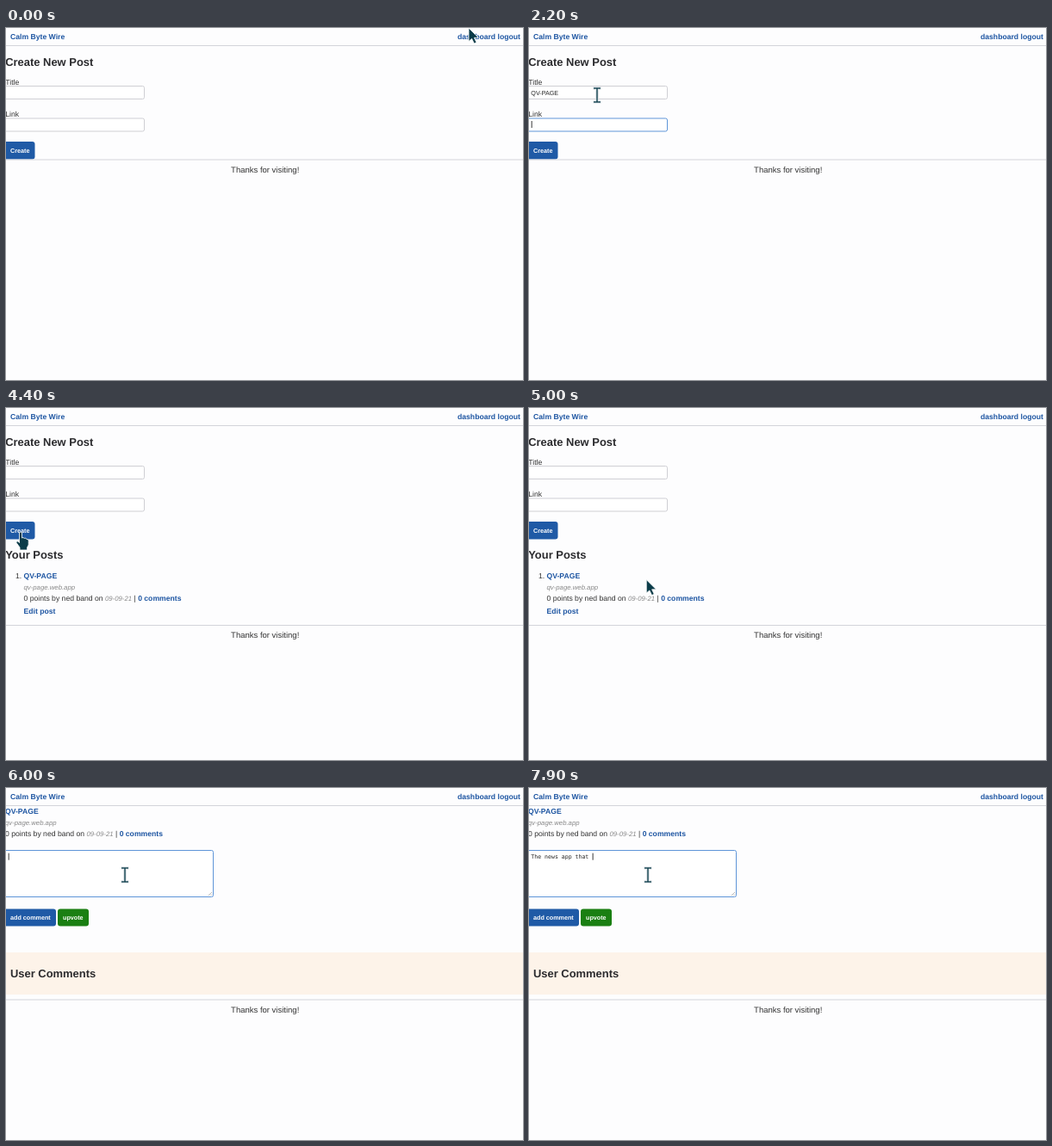
Animation, 600 px wide and 409 px high, one loop 8000 ms. Source, as an HTML page:

```html
<!DOCTYPE html>
<html lang="en">
<head>
<meta charset="utf-8">
<title>Create post demo</title>
<style>
html, body { margin: 0; width: 100%; height: 100%; overflow: hidden; background: #fdfdfe; }
svg { display: block; width: 600px; height: 409px; }
text { font: 8.63px "Liberation Sans", Arial, sans-serif; fill: #333; white-space: pre; text-rendering: geometricPrecision; }
.head { font-size: 12.95px; font-weight: bold; fill: #2b2b2e; }
.link { font-weight: bold; fill: #1d55a2; }
.note { font-size: 7.77px; font-style: italic; fill: #888; }
.typed { font-size: 7.2px; fill: #222; }
.mono { font: 6.56px "DejaVu Sans Mono", monospace; fill: #222; }
.label { font-size: 7.2px; font-weight: bold; fill: #fff; }
.thanks { font-size: 9.5px; text-anchor: middle; }
.status { font-size: 6.64px; fill: #ddd; }
.rule { stroke: #d3d4da; }
.field { fill: #fff; stroke: #cfcfd4; }
.field.focus { stroke: #5e95d8; }
.button { fill: #1f5aa6; }
.button.hot { fill: #2f7bdc; }
.link.hot { fill: #2f76d2; }
.cursor { fill: #0b3c49; stroke: #fff; stroke-width: .8; stroke-linejoin: round; }
</style>
</head>
<body>
<svg viewBox="0 0 600 409">
  <rect width="600" height="409" fill="#fdfdfe"/>
  <text class="link" x="5" y="13">Calm Byte Wire</text>
  <text class="link" x="524" y="13">dashboard logout</text>
  <path class="rule" d="M0 20.5H600"/>

  <g id="form">
    <text class="head" x="-.8" y="44">Create New Post</text>
    <text x="-.7" y="65.5">Title</text>
    <rect id="titleBox" class="field" x="-2" y="67.5" width="162.5" height="15" rx="2"/>
    <text id="titleText" class="typed" x="2.3" y="78"></text>
    <text x="-.7" y="103">Link</text>
    <rect id="linkBox" class="field" x="-2" y="105" width="162.5" height="15" rx="2"/>
    <text id="linkText" class="typed" x="2.3" y="115"></text>
    <rect id="create" class="button" x="-4" y="132" width="37.5" height="20.5" rx="3"/>
    <text class="label" x="5" y="144.8">Create</text>
  </g>

  <g id="posts">
    <text class="head" x="-.8" y="175">Your Posts</text>
    <text x="11" y="198">1.</text>
  </g>

  <g id="summary">
    <text class="link" x="20.5" y="198">QV-PAGE</text>
    <text class="note" x="20.5" y="211">qv-page.web.app</text>
    <text x="20.5" y="224">0 points by ned band on <tspan class="note">09-09-21</tspan> | <tspan id="comments" class="link">0 comments</tspan></text>
  </g>
  <text id="edit" class="link" x="20.5" y="238.7">Edit post</text>

  <g id="detail">
    <rect id="area" class="field" x="-2" y="72.5" width="242.5" height="54" rx="2"/>
    <path d="M235 125L239 121M237.5 125L239 123.5" stroke="#888" stroke-width=".6"/>
    <text id="areaText" class="mono" x="2.3" y="82"></text>
    <rect class="button" x="-4" y="140.5" width="62" height="20" rx="3"/>
    <text class="label" x="5" y="153.2">add comment</text>
    <rect x="60" y="140.5" width="36" height="20" rx="3" fill="#1a7f12"/>
    <text class="label" x="66" y="153.2">upvote</text>
    <rect y="191" width="600" height="49" fill="#fdf3e9"/>
    <text class="head" x="5" y="219.7">User Comments</text>
  </g>

  <g id="footer">
    <path class="rule" d="M0 153H600"/>
    <text class="thanks" x="300.7" y="167.5">Thanks for visiting!</text>
  </g>

  <rect id="caret" width=".9" height="8" fill="#222"/>
  <g id="status">
    <path d="M0 400H143Q145 400 145 402V409H0Z" fill="#2b2b2e"/>
    <text class="status" x="1.5" y="407.3">https://cc-java-api-5566.herokuapp.com/post/11</text>
  </g>

  <g id="arrow" class="cursor"><path d="M0 0V15.5L3.6 12.4L6.3 18L9 16.8L6.4 11.3H11.3Z"/></g>
  <g id="hand" class="cursor">
    <path d="M-1.5 .8Q0-1 1.5 .8V7Q3 5.8 4.3 7.4Q6 6.6 7 8.4Q9 8 9.2 10.2V15L7.6 18V21H-1V18L-5 12.5Q-5.2 10 -3 11L-1.5 12.6Z"/>
  </g>
  <g id="beam" fill="none">
    <path d="M-4.3-8H4.3M-4.3 8H4.3M0-8V8" stroke="#c3ccd3" stroke-width="3.6"/>
    <path d="M-4.3-8H4.3M-4.3 8H4.3M0-8V8" stroke="#fff" stroke-width="2.8"/>
    <path d="M-4-8H4M-4 8H4M0-8V8" stroke="#174653" stroke-width="1.5"/>
  </g>
</svg>
<script>
const $ = id => document.getElementById(id);
const LOOP = 8000, STEP = 100;
const TITLE = "QV-PAGE", URL_TEXT = "https://qv-page.web.app/usnews/general";
const COMMENT = "The news app that ";
const titleKeys = [1100, 1300, 1500, 1600, 1700, 1800, 1900];

// Pointer stops: time, x, y
const stops = [[0, 537, 0], [100, 537, 0], [800, 79, 78], [2800, 79, 78], [3300, 17, 144],
  [4600, 17, 144], [5200, 178, 219], [5400, 178, 219], [5900, 138, 101], [LOOP, 138, 101]];

function pointer(t) {
  const i = stops.findIndex(s => s[0] > t);
  const [t0, x0, y0] = stops[i - 1], [t1, x1, y1] = stops[i];
  const u = (t - t0) / (t1 - t0), k = u * u * (3 - 2 * u);
  return [x0 + (x1 - x0) * k, y0 + (y1 - y0) * k];
}

const commentCount = t => t < 6400 ? 0
  : t < 7000 ? Math.min(5, (t - 6300) / STEP)
  : 5 + Math.ceil(1.3 * (t - 6900) / STEP);

const show = (id, on) => $(id).style.display = on ? "" : "none";
const mark = (id, name, on) => $(id).classList.toggle(name, on);
const inside = (x, y, l, t, r, b) => x >= l && x <= r && y >= t && y <= b;

function placeCaret(field, y, t, lastKey) {
  const on = field && (t - lastKey) % 1000 < 500;
  show("caret", on);
  if (!on) return;
  $("caret").setAttribute("x", 2.7 + field.getComputedTextLength());
  $("caret").setAttribute("y", y);
}

function draw(t) {
  const page = t < 3900 ? 0 : t < 5800 ? 1 : 2;
  show("form", page < 2);
  show("posts", page == 1);
  show("summary", page > 0);
  show("edit", page == 1);
  show("detail", page == 2);
  $("summary").setAttribute("transform", page == 2 ? "translate(-21.5 -167.7)" : "");
  $("footer").setAttribute("transform", `translate(0 ${[0, 99.5, 93][page]})`);

  const keys = titleKeys.filter(k => k <= t);
  const typed = commentCount(t);
  $("titleText").textContent = page ? "" : TITLE.slice(0, keys.length);
  $("linkText").textContent = page || t < 2500 ? "" : URL_TEXT;
  $("areaText").textContent = COMMENT.slice(0, typed);

  const inTitle = t >= 900 && t < 2100, inLink = t >= 2100 && page == 0, inArea = t >= 6000;
  mark("titleBox", "focus", inTitle);
  mark("linkBox", "focus", inLink);
  mark("area", "focus", inArea);
  if (inTitle) placeCaret($("titleText"), 71, t, keys.at(-1) ?? 900);
  else if (inLink && t < 3300) placeCaret($("linkText"), 108, t, t < 2500 ? 2100 : 2500);
  else if (inArea) placeCaret($("areaText"), 75.7, t, typed ? t : 6000);
  else placeCaret(null);

  const [x, y] = pointer(t);
  const overCreate = page < 2 && inside(x, y, 0, 132, 34, 153);
  const overLink = page == 1 && inside(x, y, 153, 215, 204, 226);
  const overField = page < 2
    ? inside(x, y, 0, 67, 161, 83) || inside(x, y, 0, 105, 161, 120)
    : inside(x, y, 0, 72, 241, 127);
  const shape = overCreate || overLink ? "hand" : overField ? "beam" : "arrow";
  for (const id of ["arrow", "hand", "beam"]) show(id, id == shape);
  $(shape).setAttribute("transform", `translate(${x} ${y})`);

  mark("create", "hot", overCreate && page == 0);
  const linkActive = page == 1 && t >= 5200;
  mark("comments", "hot", linkActive);
  show("status", linkActive);
}

const start = performance.now();
function tick() {
  const t = (performance.now() - start) % LOOP;
  draw(Math.floor(t / STEP) * STEP);
  requestAnimationFrame(tick);
}
tick();
</script>
</body>
</html>
```
